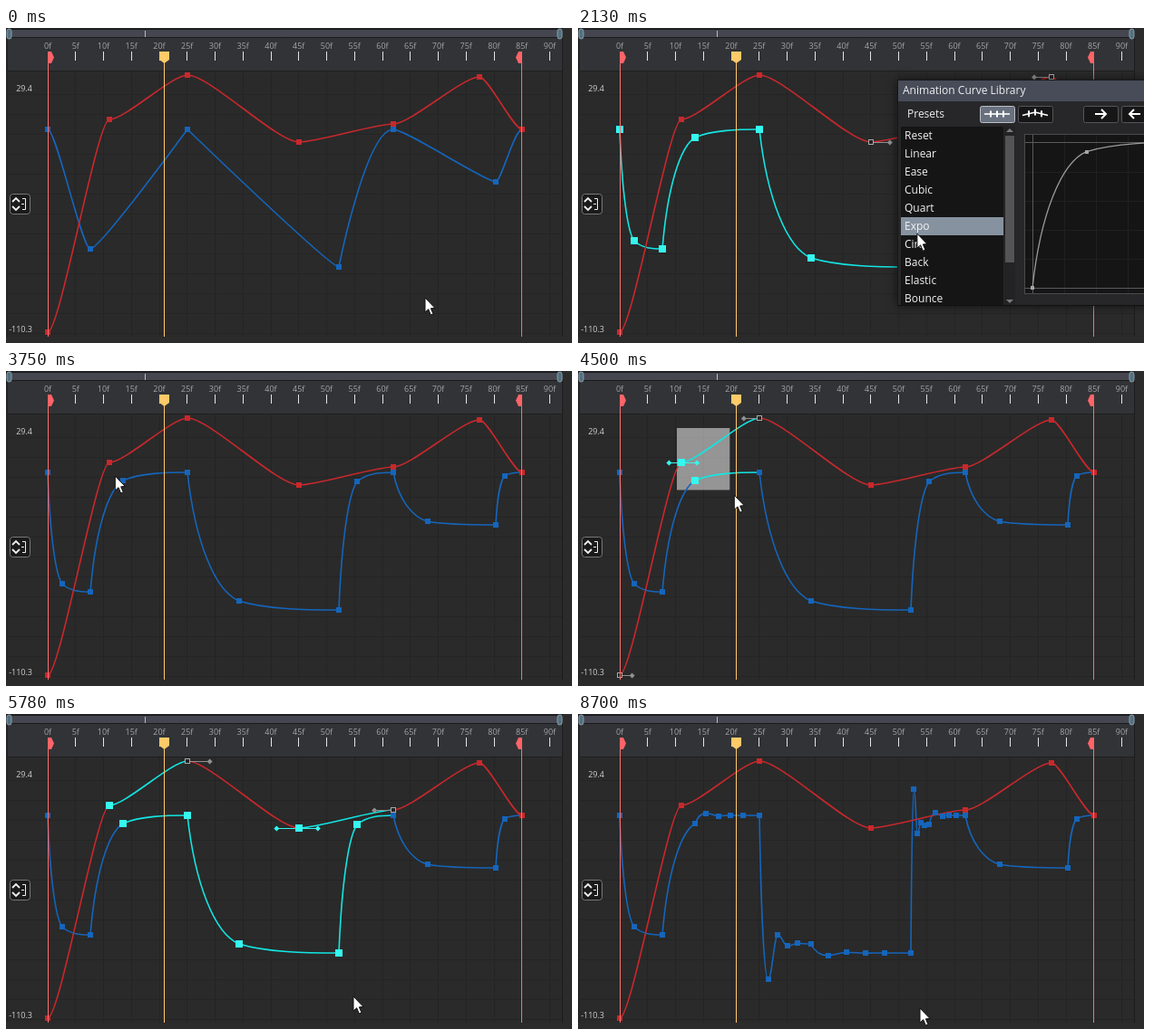
Write an HTML page with a canvas that moves like this. It is 624 px wide and 348 px high and loops after 9070 ms.

```html
<!DOCTYPE html>
<html>
<head>
<meta charset="utf-8">
<title>Curve editor</title>
<style>
html, body { margin: 0; width: 624px; height: 348px; overflow: hidden; background: #232325; }
canvas { display: block; }
</style>
</head>
<body>
<canvas id="stage" width="624" height="348"></canvas>
<script>
const g = document.getElementById('stage').getContext('2d');
const LOOP = 9070, BLUE = '#1565bb', RED = '#c8282c', CYAN = '#12e6e4', KEY = '#35f7ee';
const FONT = 'px "Open Sans", "Noto Sans", sans-serif';
const NAMES = ['Reset', 'Linear', 'Ease', 'Cubic', 'Quart', 'Expo', 'Circ', 'Back', 'Elastic', 'Bounce'];

// Pointer moves: start time, end time, x, y reached
const MOVES = [
  [30, 360, 352, 306], [590, 1440, 374, 227], [2130, 2820, 307, 327],
  [3230, 3830, 92, 84], [3830, 4130, 109, 63],
  [4180, 4500, 172, 137], [4500, 5060, 332, 245], [5060, 5700, 389, 311],
  [5700, 5780, 383, 312], [5880, 6340, 409, 322], [6520, 6521, 399, 312],
  [6900, 7080, 416, 304.5], [7080, 7310, 422, 297], [8150, 8700, 377, 325]
];

function pointer(t) {
  let x = 462, y = 298;
  for (const [from, to, ex, ey] of MOVES) {
    const u = Math.max(0, Math.min(1, (t - from) / (to - from)));
    x += (ex - x) * u;
    y += (ey - y) * u;
  }
  return [x, y];
}

// Cubics (x0 y0 cx1 cy1 cx2 cy2 x1 y1) with level handles.
// A key is x, y and the optional lengths of its handles before and after.
function flat(keys, k) {
  return keys.slice(1).map(([x, y, before = k], i) => {
    const [a, b, , after = k] = keys[i], d = x - a;
    return [a, b, a + d * after, b, x - d * before, y, x, y];
  });
}

const redKeys = [[46, 336], [114, 101], [200, 52], [323, 126], [427, 106], [522, 54], [569, 112]];
const red = flat(redKeys, .2);
const base = flat([[46, 112], [93, 244, .2, .1], [200, 112, 0, 0], [367, 264, .06, 0],
  [427, 112, .5, .12], [540, 170, .1], [569, 112, .3]], .2);

const expo = [[0, 0, .05, .5, .18, .86, .34, .934], [.34, .934, .52, .995, .78, 1, 1, 1]];
const swings = Array.from({ length: 5 }, (_, i) => [i < 4 ? .17 + .19 * i : 1, 1 + .275 * (-.25) ** i]);
const elastic = [[0, 0, .03, .7, .09, 1.275, .17, 1.275], ...flat(swings, .4)];

// Stretch a unit curve into a box
const fit = (unit, x0, y0, x1, y1) => unit.map(s =>
  s.map((v, i) => i % 2 ? y0 + v * (y1 - y0) : x0 + v * (x1 - x0)));
const preset = (unit, s) => fit(unit, s[0], s[1], s[6], s[7]);

const eased = base.flatMap(s => preset(expo, s));
const sprung = eased.flatMap((s, i) => i > 2 && i < 8 ? preset(elastic, s) : [s]);

const formulas = {
  Linear: x => x,
  Ease: x => x * x * (3 - 2 * x),
  Cubic: x => 1 - (1 - x) ** 3,
  Quart: x => 1 - (1 - x) ** 4,
  Circ: x => Math.sqrt(1 - (1 - x) ** 2),
  Back: x => 1 + 2.7 * (x - 1) ** 3 + 1.7 * (x - 1) ** 2,
  Bounce: x => 1 - Math.abs(Math.cos(x * 3.5 * Math.PI)) * (1 - x) ** 2
};

function rect(x, y, w, h, c) { g.fillStyle = c; g.fillRect(x, y, w, h); }

function shape(pts, fill, stroke, w = 1) {
  g.beginPath();
  pts.forEach(([x, y], i) => i ? g.lineTo(x, y) : g.moveTo(x, y));
  if (fill) { g.closePath(); g.fillStyle = fill; g.fill(); }
  if (stroke) { g.strokeStyle = stroke; g.lineWidth = w; g.stroke(); }
}

function rounded(x, y, w, h, r, fill, stroke) {
  g.beginPath();
  g.roundRect(x, y, w, h, r);
  g.fillStyle = fill;
  g.fill();
  g.strokeStyle = stroke;
  g.lineWidth = 1;
  g.stroke();
}

function text(s, x, y, size, color, align = 'left') {
  g.font = size + FONT;
  g.textAlign = align;
  g.fillStyle = color;
  g.fillText(s, x, y);
}

function cubic(s, color, w = 1.6) {
  g.beginPath();
  g.moveTo(s[0], s[1]);
  g.bezierCurveTo(...s.slice(2));
  g.strokeStyle = color;
  g.lineWidth = w;
  g.stroke();
}

const dot = (x, y, size, c) => rect(Math.round(x) - size / 2, Math.round(y) - size / 2, size, size, c);
const keysOf = segs => [...segs.map(s => [s[0], s[1]]), segs[segs.length - 1].slice(6)];

function chevron(x, y, d, r = 4) {
  return [[x - r, y], [x, y + d * r], [x + r, y]];
}

function backdrop() {
  rect(0, 0, 624, 348, '#242426');
  rect(2, 11, 611, 36, '#323336');
  rect(2, 47, 611, 294, '#2a2a2a');
  rect(0, 341, 624, 7, '#2b2b2c');
  rect(614, 0, 10, 341, '#2b2b2c');
  rect(613, 11, 1, 330, '#1c1c1d');
  rect(2, 47, 611, 1, '#1f1f20');
  rounded(4, 1.5, 607, 9, 3, '#45464f', '#191a1c');
  rect(153, 3, 1, 7, '#b9bbc2');
  for (const x of [1, 608]) rounded(x, 1, 5, 11, 3, '#527080', '#8ba0aa');
  for (let y = 73; y < 341; y += 22) rect(2, y, 611, 1, '#242424');
  for (let i = 0; i < 19; i++) {
    const x = 46 + i * 30.75, px = Math.floor(x);
    rect(px, 48, 1, 293, '#242424');
    rect(px, 26, 1, 10, '#e4e4e4');
    text(i * 5 + 'f', x, 23, 9, '#a4a4a6', 'center');
  }
  text('29.4', 29, 70, 9, '#d0d0d0', 'right');
  text('-110.3', 29, 336, 9, '#d0d0d0', 'right');
}

function markers() {
  for (const [x, d] of [[46, 1], [569, -1]]) {
    rect(Math.min(x, x + d), 26, 1, 315, '#ff6e6e');
    shape([[x, 26], [x + 4 * d, 26], [x + 7 * d, 32.5], [x + 4 * d, 39], [x, 39]], '#ff6468');
  }
  rect(174, 26, 1, 315, '#ffca69');
  shape([[169, 26], [180, 26], [180, 35], [174.5, 39], [169, 35]], '#ffca69');
  rounded(4.5, 183.5, 22, 22, 3, '#1b1b1c', '#77787a');
  shape(chevron(11, 192, -1), null, '#f0f0f0', 1.8);
  shape(chevron(11, 197, 1), null, '#f0f0f0', 1.8);
  shape([[18, 188.5], [21.5, 188.5], [21.5, 200.5], [18, 200.5]], null, '#f0f0f0');
  rect(17, 194, 3, 1, '#f0f0f0');
}

function handle(i, side, color) {
  const [x, y] = redKeys[i], hx = x + (redKeys[i + side][0] - x) * .2;
  shape([[x, y + .5], [hx, y + .5]], null, color);
  shape([[hx - 3, y + .5], [hx, y - 2.5], [hx + 3, y + .5], [hx, y + 3.5]], color);
}

function handles(a) {
  for (const d of [-1, 1]) {
    handle(a, d, KEY);
    handle(a + d, -d, '#909090');
    dot(...redKeys[a + d], 6, '#a8a8a8');
    dot(...redKeys[a + d], 4, '#252525');
  }
}

function preview(name, px, py) {
  const springy = name === 'Elastic', x0 = px + 149, y0 = py + 230;
  const height = springy ? 125.5 : 161;
  rect(px + 140, py + 60, 200, 177, '#4b4b4d');
  rect(px + 141, py + 61, 200, 175, '#151516');
  for (let i = 1; i < 5; i++) {
    rect(x0 + i * 35, py + 61, 1, 175, '#202021');
    rect(px + 141, py + 70 + i * 32, 200, 1, '#202021');
  }
  rect(x0, py + 61, 1, 175, '#5a5a5c');
  rect(px + 141, y0, 200, 1, '#5a5a5c');
  rect(px + 141, Math.round(y0 - height), 200, 1, springy ? '#17696c' : '#5a5a5c');

  if (springy || name === 'Expo') {
    const segs = fit(springy ? elastic : expo, x0, y0, x0 + 175, y0 - height);
    segs.forEach(s => cubic(s, '#9a9a9a', 1.3));
    keysOf(segs).forEach(([x, y]) => dot(x, y, 4, '#a4a4a4'));
  } else if (formulas[name]) {
    const pts = Array.from({ length: 101 }, (_, i) =>
      [x0 + i * 1.75, y0 - height * formulas[name](i / 100)]);
    shape(pts, null, '#9a9a9a', 1.3);
  }
}

function tangentIcon(x, y, bend) {
  const pts = [-14, -7, 0, 7, 14].map(d => [x + d, y + bend * (Math.abs(d) / 4 - 2)]);
  shape(pts, null, '#fff', 1.6);
  pts.slice(1, 4).forEach(([a, b]) => rect(a - 1, b - 3.5, 2, 7, '#fff'));
}

function arrowIcon(x, y, d) {
  shape([[x - 6 * d, y], [x + 5 * d, y]], null, '#fff', 2);
  shape([[x + d, y - 5], [x + 6 * d, y], [x + d, y + 5]], null, '#fff', 2);
}

function panel(px, py, mx, my) {
  g.shadowColor = 'rgba(0,0,0,.6)';
  g.shadowBlur = 10;
  rect(px, py, 300, 250, '#17181a');
  g.shadowBlur = 0;
  g.shadowColor = 'transparent';
  rect(px + 1, py + 1, 299, 23, '#474c58');
  rect(px + 1, py + 24, 299, 225, '#272729');
  text('Animation Curve Library', px + 6, py + 16, 12, '#eeeef0');
  text('Presets', px + 11, py + 42, 12, '#eeeeee');
  [91, 133, 205, 247].forEach((x, i) =>
    rounded(px + x + .5, py + 29.5, 38, 18, 2, i ? '#161617' : '#69717f', i ? '#55565a' : '#b9bec6'));
  tangentIcon(px + 110, py + 38, 0);
  tangentIcon(px + 152, py + 38, 1);
  arrowIcon(px + 224, py + 38, 1);
  arrowIcon(px + 262, py + 38, -1);

  // Preset list
  rect(px + 4, py + 52, 113, 197, '#151516');
  const over = mx >= px + 4 && mx < px + 117 && my >= py + 52 && my < py + 249;
  const row = over ? Math.floor((my - py - 52) / 20) : -1;
  if (over) rect(px + 4, py + 52 + row * 20, 113, Math.min(20, 197 - row * 20), '#86929f');
  NAMES.forEach((n, i) => text(n, px + 8, py + 66 + i * 20, 12, '#f2f2f2'));
  rect(px + 118, py + 52, 12, 197, '#232325');
  rect(px + 119, py + 62, 10, 140, '#545456');
  shape(chevron(px + 124, py + 58, -1), '#7a7a7c');
  shape(chevron(px + 124, py + 243, 1), '#7a7a7c');
  preview(NAMES[row], px, py);
  rect(px, py + 249, 300, 1, '#111');
}

function cursor(x, y) {
  const pts = [[0, 0], [0, 16], [3.7, 12.7], [6.3, 19], [9, 18], [6.4, 11.8], [11, 11.5], [0, 0]];
  g.lineJoin = 'round';
  shape(pts.map(([a, b]) => [x + a, y + b]), '#fff', '#111');
  g.lineJoin = 'miter';
}

function draw(t) {
  const [mx, my] = pointer(t);
  const first = t >= 590 && t < 2640, second = t >= 6520 && t < 8520;
  const blue = t < 1620 ? base : t < 7540 ? eased : sprung;
  let chosen = () => false, redChosen = chosen, active = 0, box = null;

  if (t >= 1620 && first) {
    chosen = () => true;
    redChosen = x => x === 427;
    active = 4;
  } else if (t >= 4180 && t < 7540) {
    // The selection box trails the pointer a little
    const [ex, ey] = pointer(Math.max(4180, Math.min(t - 25, 5700)));
    chosen = redChosen = (x, y) => x > 106 && x < ex + 3 && y > 60 && y < ey + 3;
    active = redChosen(...redKeys[3]) ? 3 : redChosen(...redKeys[1]) ? 1 : 0;
    if (t < 5780) box = [109, 63, ex - 109, ey - 63];
  } else if (t >= 7540 && second) {
    chosen = x => x > 125 && x < 425;
    redChosen = x => x === 323;
    active = 3;
  }

  backdrop();
  if (box) rect(...box, 'rgba(255,255,255,.5)');
  const blueLit = s => chosen(s[0], s[1]) || (first && t < 1620);
  const redLit = s => redChosen(s[0], s[1]) && !first && !second;
  blue.forEach(s => cubic(s, blueLit(s) ? CYAN : BLUE));
  red.forEach(s => cubic(s, redLit(s) ? CYAN : RED));
  const drawKeys = (list, test, color) => list.forEach(([x, y]) =>
    test(x, y) ? dot(x, y, 8, KEY) : dot(x, y, 6, color));
  drawKeys(keysOf(blue), chosen, BLUE);
  drawKeys(redKeys, redChosen, RED);
  if (active) handles(active);
  markers();
  if (first) panel(352, 57, mx, my);
  if (second) panel(408, 73, mx, my);
  cursor(mx, my);
}

const start = performance.now();
function tick() {
  draw((performance.now() - start) % LOOP);
  requestAnimationFrame(tick);
}
tick();
</script>
</body>
</html>
```
